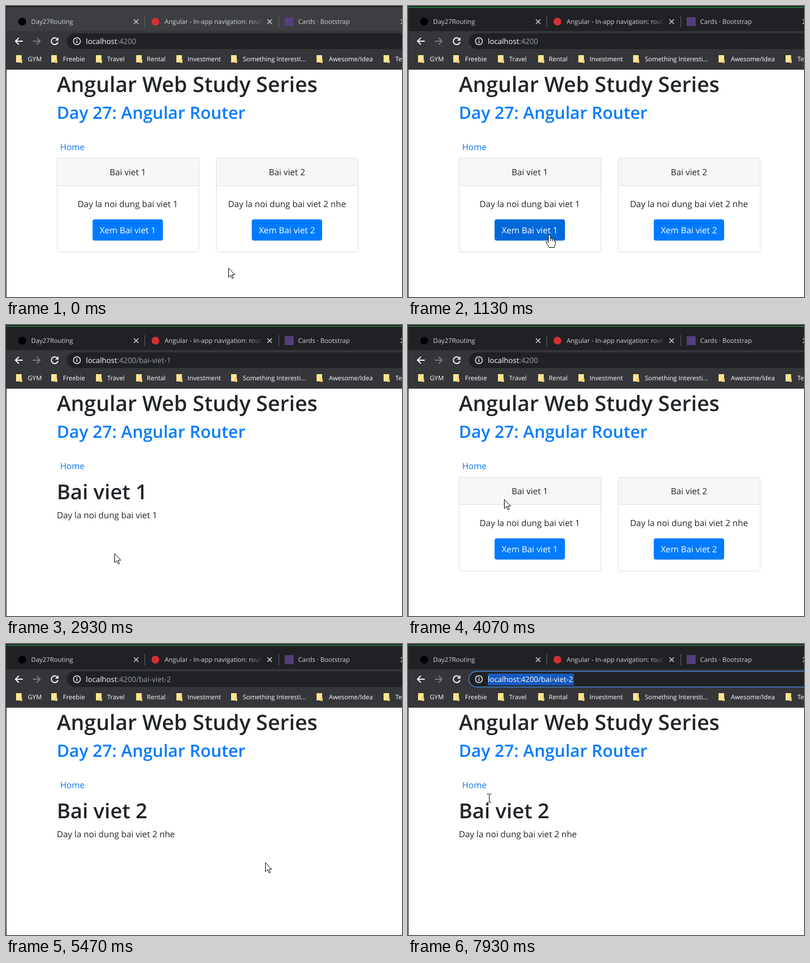
An HTML page for the animation above (8 s loop, 709 by 521 pixels).

```html
<!DOCTYPE html>
<html lang="en">
<head>
<meta charset="utf-8">
<title>Router demo</title>
<style>
html, body { margin: 0; width: 100%; height: 100%; overflow: hidden; background: #fff; }
svg { display: block; width: 100vw; height: 100vh; }
text { font-family: "Open Sans", "Noto Sans", sans-serif; text-rendering: geometricPrecision; white-space: pre; }
.line { fill: none; stroke-width: 2; }
</style>
</head>
<body>
<svg id="stage" viewBox="0 0 709 521">
  <defs>
    <linearGradient id="fade" gradientUnits="userSpaceOnUse" x1="436" x2="460" y1="0" y2="0">
      <stop stop-color="#d0d3d7"/><stop offset="1" stop-color="#d0d3d7" stop-opacity="0"/>
    </linearGradient>
  </defs>
  <rect width="709" height="521" fill="#fff"/>
  <g id="chrome"></g>
  <g id="page"></g>
  <g id="cards"></g>
  <g id="article"></g>
  <g id="arrow" stroke="#000" fill="#fff"><path d="M.5.5V16.6L4.2 13 6.9 18.8 9.2 17.8 6.6 12.2H11.7Z"/></g>
  <g id="hand" stroke="#000" fill="#fff" stroke-linejoin="round">
    <path d="M-1.6 2.2a1.8 1.8 0 0 1 3.6 0V8c.5-1 3-1 3.5.7 1-.9 3-.5 3.2 1 1-.6 2.3 0 2.3 1.6V16c0 4-2 4-2 7.5H-.5c0-2.5-4.5-6-5.3-9.3-.3-1.8 1.8-2 2.8-.6L-1.6 15Z"/>
    <path d="M2 8v4M5.5 9v3M8.7 10v3" fill="none"/>
  </g>
  <g id="beam" fill="none"><path d="M-4-7.5h3l1 1 1-1h3M0-7V7M-4 7.5h3l1-1 1 1h3"/></g>
</svg>
<script>
const $ = id => document.getElementById(id);
const LOOP = 8000, FPS = 15;
const BLUE = '#007bff', INK = '#212529', PALE = '#e8eaed', DIM = '#9aa0a6', TAB = '#d0d3d7';
const BODY = 15.4, SMALL = 11.4, TABSIZE = 11.5;

const text = (x, y, s, size, fill, more = '') =>
  `<text x="${x}" y="${y}" font-size="${size}" fill="${fill}" ${more}>${s}</text>`;
const rect = (x, y, w, h, fill, more = '') =>
  `<rect x="${x}" y="${y}" width="${w}" height="${h}" fill="${fill}" ${more}/>`;
const line = (d, stroke, more = '') => `<path class="line" d="${d}" stroke="${stroke}" ${more}/>`;
const MID = 'text-anchor="middle"', SEMI = 'font-weight="600"';
const show = (id, on) => $(id).setAttribute('visibility', on ? 'visible' : 'hidden');

function drawChrome() {
  const close = x => line(`M${x - 4} 24l8 8m0-8l-8 8`, TAB, 'style="stroke-width:1.5"');
  const bookmarks = [
    [17, 39, 'GYM'], [80, 102, 'Freebie'], [160, 181, 'Travel'], [232, 252, 'Rental'],
    [304, 325, 'Investment'], [402, 424, 'Something Interesti...'],
    [555, 578, 'Awesome/Idea'], [675, 697, 'Tech']
  ];
  $('chrome').innerHTML =
    rect(0, 0, 709, 46, '#202124', 'id="strip"') +
    rect(0, 0, 709, 2, '#1e1f21') +
    rect(0, 2, 709, 1, '#29b34a', 'id="edge"') +
    '<circle cx="29" cy="28" r="7" fill="#000"/><circle cx="267.5" cy="28" r="7" fill="#d32f35"/>' +
    rect(499, 20, 16, 16, '#563d7c') +
    text(45, 32, 'Day27Routing', TABSIZE, TAB) +
    text(284, 32, 'Angular - In-app navigation: rout', TABSIZE, 'url(#fade)') +
    text(523, 32, 'Cards · Bootstrap', TABSIZE, TAB) +
    close(233) + close(472) + close(711) +
    rect(248, 18, 1, 20, '#5f6368') + rect(488, 18, 1, 20, '#5f6368') +
    rect(0, 45, 709, 69, '#35363a') +
    line('M30 63H17.5M23 57l-6 6 6 6', '#f1f3f4') +
    line('M48 63H60.5M55 57l6 6-6 6', '#77797d') +
    line('M92 59.5A6 6 0 1 0 93 64.5', '#f1f3f4') +
    '<path d="M94 56v6h-6z" fill="#f1f3f4"/>' +
    rect(109, 49, 640, 28, '#202124', 'rx="14" id="pill"') +
    '<circle cx="127" cy="63" r="6.2" class="line" stroke="#e8eaed" style="stroke-width:1.5"/>' +
    rect(126.2, 62, 1.6, 4.4, PALE) + rect(126.2, 59.3, 1.6, 1.7, PALE) +
    rect(143, 53, 154, 21, '#1659be', 'id="pick"') +
    text(143, 68, `<tspan fill="#fff">localhost</tspan><tspan id="path"></tspan>`, 13.35, DIM, 'id="url"') +
    bookmarks.map(([x, tx, s]) =>
      rect(x + 1, 88, 10, 13, '#ffe594') + rect(x + 8, 96, 4, 6, '#f0cd6a') +
      text(tx, 99, s, SMALL, '#fff')).join('') +
    rect(0, 0, 1, 521, '#2b2c2e');
}

function drawPage() {
  $('page').innerHTML =
    text(91, 154, 'Angular Web Study Series', 37.9, INK, SEMI) +
    text(91, 202, 'Day 27: Angular Router', 30.4, BLUE, SEMI) +
    text(97, 258, 'Home', BODY, BLUE, 'id="home"');
  const card = (x, n, tail) => {
    const cx = x + 127;
    return rect(x, 272, 255, 50, '#f7f7f7', 'rx="4"') +
      rect(x, 321, 255, 1, '#dfdfdf') +
      rect(x + .5, 272.5, 254, 168, 'none', 'rx="4" stroke="#dfdfdf"') +
      text(cx, 303, `Bai viet ${n}`, BODY, INK, MID) +
      text(cx, 360, `Day la noi dung bai viet ${n}${tail}`, BODY, INK, MID) +
      rect(x + 64, 382, 126, 38, BLUE, `rx="4" id="btn${n}"`) +
      text(cx, 407, `Xem Bai viet ${n}`, BODY, '#fff', MID);
  };
  $('cards').innerHTML = card(91, 1, '') + card(376, 2, ' nhe');
  $('article').innerHTML =
    text(91, 312, '', 36.9, INK, SEMI + ' id="head"') + text(91, 346, '', BODY, INK, 'id="lead"');
}

// Pointer keys: tick, x, y
const keys = [
  [0, 398, 469], [7, 260, 416], [11, 260, 416], [13, 253, 409], [38, 253, 409],
  [41, 226, 414], [44, 194, 409], [51, 128, 255], [59, 128, 255], [61, 172, 312],
  [64, 285, 378], [67, 405, 428], [71, 464, 391], [88, 464, 391], [96, 125, 66],
  [101, 347, 52], [104, 347, 52], [111, 135, 65], [114, 135, 65], [116, 114, 96],
  [118, 143, 215], [119, 145, 276]
];

// Smooth curve without overshoot; it rests wherever the pointer stops or turns.
function along(n, axis) {
  let i = 0;
  while (i < keys.length - 2 && n >= keys[i + 1][0]) i++;
  const slope = j => keys[j] && keys[j + 1]
    ? (keys[j + 1][axis] - keys[j][axis]) / (keys[j + 1][0] - keys[j][0]) : 0;
  const tangent = j => slope(j - 1) * slope(j) > 0 ? (slope(j - 1) + slope(j)) / 2 : 0;
  const [a, b] = [keys[i], keys[i + 1]], span = b[0] - a[0];
  const u = Math.min(1, (n - a[0]) / span), v = 1 - u;
  return a[axis] * v * v * (1 + 2 * u) + b[axis] * u * u * (3 - 2 * u) +
    span * u * v * (tangent(i) * v - tangent(i + 1) * u);
}

const inside = (x, y, l, t, r, b) => x >= l && x <= r && y >= t && y <= b;
const cardsAt = n => n < 18 || (n >= 60 && n < 73);

function render(ms) {
  const n = Math.floor((ms % LOOP + 8) * FPS / 1000) % 120;
  const x = Math.round(along(n, 1)), y = Math.round(along(n, 2));
  const active = n >= 17, picked = n >= 102;
  const post = n >= 73 ? 2 : n >= 18 && n < 52 ? 1 : 0;
  const loaded = n >= 82 || (n >= 26 && n < 52);
  const overUrl = inside(x, y, 109, 49, 709, 77);

  $('strip').setAttribute('fill', active ? '#202124' : '#3c3e41');
  show('edge', active);
  show('pick', picked);
  $('pill').setAttribute('fill', overUrl && !picked ? '#292a2d' : '#202124');
  $('pill').setAttribute('stroke', picked ? '#3f70aa' : 'none');
  $('pill').setAttribute('stroke-width', 2);
  $('url').setAttribute('fill', picked ? '#fff' : DIM);
  $('path').textContent = ':4200' + (post ? '/bai-viet-' + post : '');

  show('cards', cardsAt(n));
  show('article', loaded);
  $('head').textContent = 'Bai viet ' + post;
  $('lead').textContent = `Day la noi dung bai viet ${post}${post === 2 ? ' nhe' : ''}`;

  const over1 = inside(x, y, 155, 382, 281, 420), over2 = inside(x, y, 440, 382, 566, 420);
  const overHome = inside(x, y, 97, 243, 139, 264);
  $('btn1').setAttribute('fill', over1 ? '#0069d9' : BLUE);
  $('btn2').setAttribute('fill', over2 ? '#0069d9' : BLUE);
  $('home').setAttribute('fill', overHome ? '#0056b3' : BLUE);
  $('home').setAttribute('text-decoration', overHome ? 'underline' : 'none');

  // The pointer shape lags one tick behind the page.
  const link = overHome || (cardsAt(n - 1) && (over1 || over2));
  const onText = overUrl || inside(x, y, 91, 118, 557, 165) ||
    inside(x, y, 91, 172, 428, 211) || (loaded && inside(x, y, 91, 274, 256, 322)) ||
    (cardsAt(n) && inside(x, y, 128, 345, 308, 366));
  const shape = link ? 'hand' : onText ? 'beam' : 'arrow';
  for (const id of ['arrow', 'hand', 'beam']) show(id, id === shape);
  $(shape).setAttribute('transform', `translate(${shape === 'beam' ? x + .5 : x} ${y})`);
  $('beam').setAttribute('stroke', y < 114 ? '#e8eaed' : '#000');
}

drawChrome();
drawPage();
const start = performance.now();
function tick() {
  render(performance.now() - start);
  requestAnimationFrame(tick);
}
tick();
</script>
</body>
</html>
```
